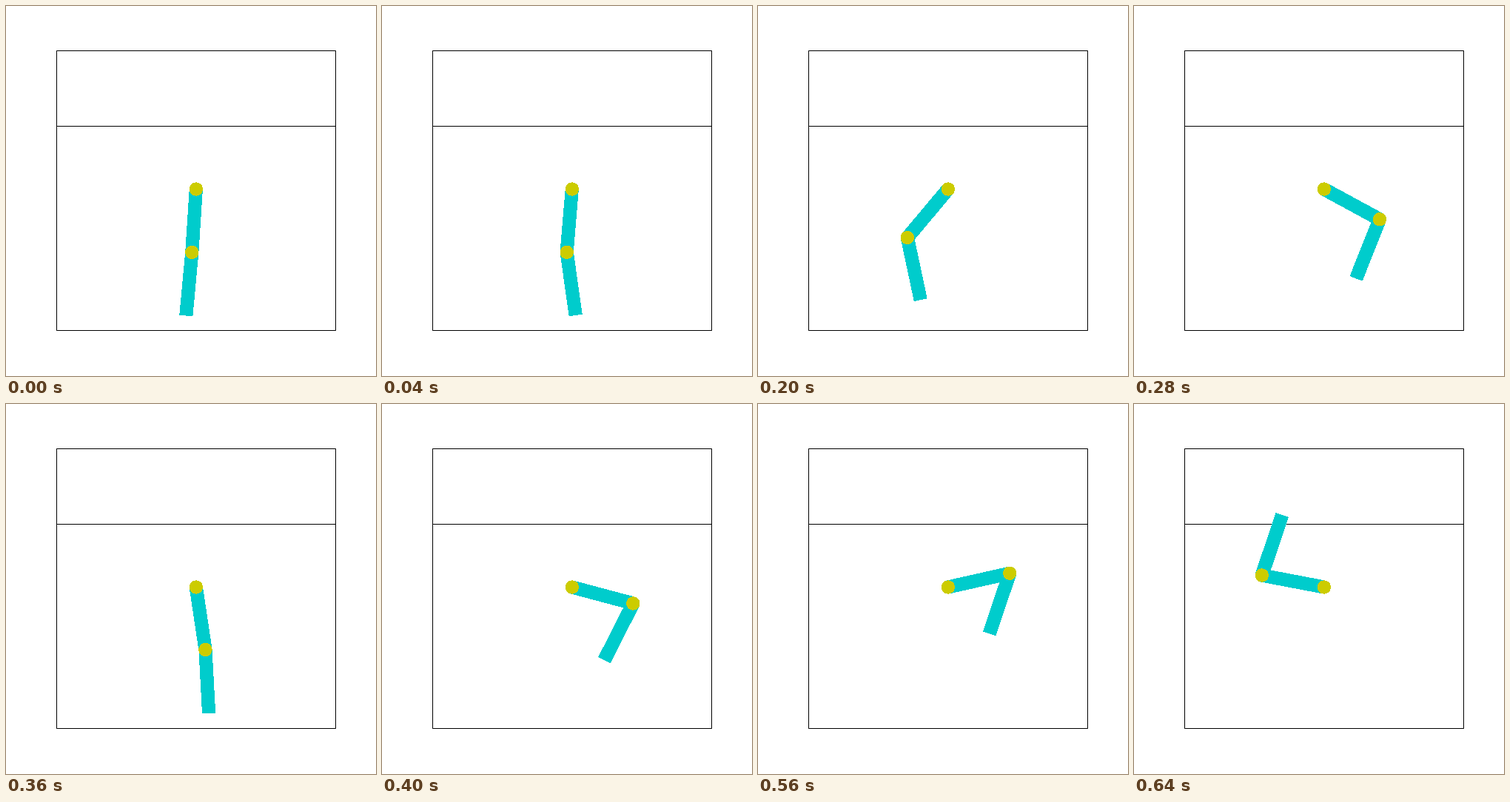
Animation, 500 px wide and 500 px high, one loop 0.68 s. Source, as a matplotlib script:

```python
import numpy as np
import matplotlib.pyplot as plt
from matplotlib.animation import FuncAnimation
from matplotlib.patches import Circle, Polygon, Rectangle

SIZE = 500
FRAMES = 17
UNIT = 85.5          # pixels per link length
HALF = 0.1 * UNIT    # half link width and joint radius
PIVOT = np.array([256.8, 247.5])
CYAN = (0, 0.8, 0.8)
YELLOW = (0.8, 0.8, 0)

# Turning points of the swing: time, upper link angle, elbow bend (degrees).
# Zero hangs straight down, positive turns to the right.
TURNS = np.array([
    (0, -3.7, -1.6), (3, -6.3, 32.6), (5, -40, 52), (7, 61.5, -83.2),
    (8.5, -40, 65), (10, 75.1, -102.1), (12, -94.7, 139),
    (14, 102.7, -121.4), (16, -100.8, 262.3),
])

fig = plt.figure(figsize=(5, 5), dpi=100, facecolor="white")
ax = fig.add_axes([0, 0, 1, 1])
ax.set_xlim(0, SIZE)
ax.set_ylim(SIZE, 0)
ax.axis("off")

ax.plot([68, 445], [162, 162], color="black", lw=0.72, zorder=1)
ax.add_patch(Rectangle((68, 60), 377, 378, fill=False,
                       ec="black", lw=0.72, zorder=6))


def add_link(z):
    link = Polygon(np.zeros((4, 2)), fc=CYAN, lw=0, aa=False, zorder=z)
    return ax.add_patch(link)


def add_joint(z):
    joint = Circle(PIVOT, HALF, fc=YELLOW, lw=0, aa=False, zorder=z)
    return ax.add_patch(joint)


upper, shoulder = add_link(2), add_joint(3)
lower, elbow = add_link(4), add_joint(5)


def pose(t):
    """Swing from one turning point to the next, fast first, then slowing."""
    k = min(np.searchsorted(TURNS[:, 0], t, side="right"), len(TURNS) - 1)
    a, b = TURNS[k - 1], TURNS[k]
    u = (t - a[0]) / (b[0] - a[0])
    ease = 1 - (1 - u) ** 1.35
    return a[1:] + (b[1:] - a[1:]) * ease


def place_link(link, start, angle):
    """Lay a link from start and return its far end."""
    a = np.radians(angle)
    along = UNIT * np.array([np.sin(a), np.cos(a)])
    side = HALF * np.array([np.cos(a), -np.sin(a)])
    end = start + along
    link.set_xy([start - side, start + side, end + side, end - side])
    return end


def draw(i):
    swing, bend = pose(i)
    joint = place_link(upper, PIVOT, swing)
    place_link(lower, joint, swing + bend)
    elbow.center = joint
    return upper, shoulder, lower, elbow


anim = FuncAnimation(fig, draw, frames=FRAMES, interval=40,
                     repeat=True, repeat_delay=0)
plt.show()
```
